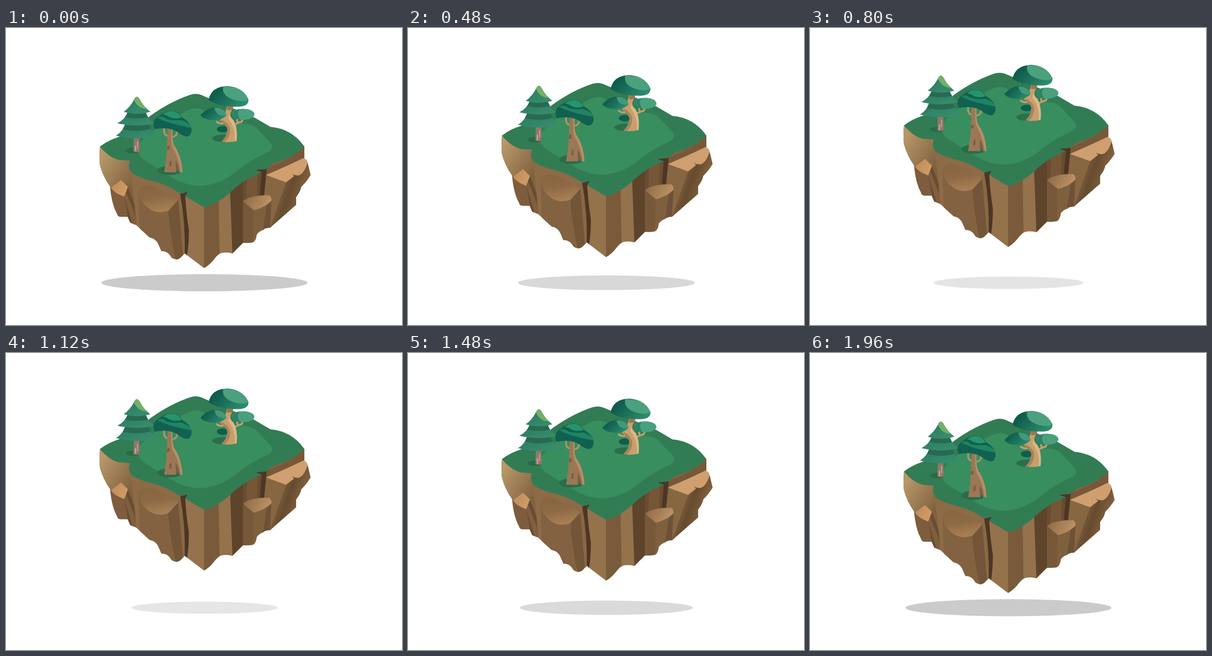
An HTML page for the animation above (2 s loop, 864 px wide and 648 px high).

```html
<!DOCTYPE html>
<html lang="en">
<head>
<meta charset="utf-8">
<title>Floating island</title>
<style>
  html, body { margin: 0; width: 100%; height: 100%; overflow: hidden; background: #fff; }
  svg { display: block; width: 100vw; height: 100vh; }
</style>
</head>
<body>
<svg viewBox="0 0 864 648">
  <defs>
    <linearGradient id="cliff" gradientUnits="userSpaceOnUse" x1="208" y1="280" x2="284" y2="328">
      <stop offset="0" stop-color="#b79869"/><stop offset="1" stop-color="#80613f"/>
    </linearGradient>
    <linearGradient id="boulder" x1=".4" y1="0" x2=".6" y2="1">
      <stop offset="0" stop-color="#87653f"/><stop offset=".45" stop-color="#8d6a45"/><stop offset="1" stop-color="#ab8156"/>
    </linearGradient>
    <linearGradient id="ledge" x1="0" y1=".3" x2="1" y2=".6">
      <stop offset="0" stop-color="#8f6c45"/><stop offset="1" stop-color="#c19468"/>
    </linearGradient>
    <linearGradient id="chip" x1="0" y1="0" x2="1" y2=".5">
      <stop offset="0" stop-color="#bb8a57"/><stop offset="1" stop-color="#d09b65"/>
    </linearGradient>
    <linearGradient id="east" gradientUnits="userSpaceOnUse" x1="603" y1="345" x2="652" y2="362">
      <stop offset="0" stop-color="#7b5b3a"/><stop offset=".35" stop-color="#664b2f"/><stop offset="1" stop-color="#856340"/>
    </linearGradient>
    <linearGradient id="leaf" x1="0" y1=".2" x2="1" y2=".7">
      <stop offset=".2" stop-color="#105d4d"/><stop offset="1" stop-color="#2d8d6f"/>
    </linearGradient>
    <linearGradient id="needle" x1="0" y1="0" x2="1" y2="1">
      <stop offset="0" stop-color="#2a7a63"/><stop offset="1" stop-color="#39906c"/>
    </linearGradient>
  </defs>

  <ellipse id="shadow" rx="225" ry="18.7"/>

  <g id="island">
    <!-- soil -->
    <path fill="#836342" d="M205 258Q203 285 205 299Q212 324 227 345Q230 382 242 404Q244 411 249 411H265L271 424L284 429L313 456Q328 459 333 472L339 486Q353 485 361 500Q370 507 380 501L390 491L432 523Q442 518 453 505Q463 492 470 490Q482 487 494 491L517 468Q545 469 547 450Q559 435 576 435L633 385V368Q643 355 644 346Q657 333 664.500 320L658 293Q656 288 651 284V258L433 240Z"/>
    <path fill="url(#cliff)" d="M205 258Q225 282 246 287L271 288L275 319L283 395L266 346L251 331L230 348L227 345Q212 324 205 299Q203 285 205 258Z"/>
    <path fill="#7d5d3d" d="M229 348L258 367L267 411H249Q244 411 242 404Q230 382 229 348Z"/>
    <path fill="#694d32" d="M258 367L266 346L282 388L284 429L271 424L266 411Z"/>
    <path fill="#7f5f3e" d="M258 367L262 357L281 405L284 429L276 426Z"/>
    <path fill="url(#chip)" d="M229 348L251 331L266 346L258 367Q238 361 229 348Z"/>
    <path fill="#8d6b47" d="M272 312L335 334L384 358L378 376L289 352L292 436L284 429L281 390Z"/>

    <!-- west boulder -->
    <path fill="#826240" d="M289 352L354 399L372 504L361 500Q353 485 339 486L333 472Q328 459 313 456L292 437Z"/>
    <path fill="#735537" d="M354 399L376 374L387 494L380 501Q374 505 370 504Q358 450 354 399Z"/>
    <path fill="#8a6844" d="M376 374L382 361L391 490L386 495Z"/>
    <path fill="url(#boulder)" d="M289 353Q295 342 314 342Q350 355 376 374L354 398Q335 405 318 397Q291 382 289 353Z"/>

    <!-- front faces -->
    <path fill="#94724c" d="M391 364L433 389V523L394 494Z"/>
    <path fill="#795b3b" d="M432 389L465 374L466 491Q458 497 453 505Q442 518 432 523Z"/>
    <path fill="#94724c" d="M464 375L490 355L494 491Q480 487 466 491Z"/>
    <path fill="#5e442b" d="M489 355L517 333V468L494 491Z"/>
    <path fill="#755738" d="M517 333L559 311L556 370L517 380Z"/>
    <path fill="#694c31" d="M517 333L526 327L524 375L517 379ZM549 315L558 311L555 368L548 368Z"/>
    <path fill="#4d3624" d="M380 361L397 356L391 367Q393 402 399 440Q399 474 395 495L390 491Q392 425 380 361Z"/>

    <!-- east rocks -->
    <path fill="#785838" d="M566 306Q625 285 651 257V285L568 321Z"/>
    <path fill="#876642" d="M567 320L611 336L604 378L578 434Q567 434 560 438L563 365Z"/>
    <path fill="url(#east)" d="M611 336L628 322L658 293L664.500 320Q657 333 644 346Q643 355 633 368V385L576 435Q594 385 611 336Z"/>
    <path fill="#cf9f6f" d="M567 320Q612 301 649 283Q657 285 658 293Q650 319 637 321Q630 321 624 317L628 323L611 336Z"/>
    <path fill="#4d3624" d="M543 309L569 306L563 366L554 364L558 314Z"/>
    <path fill="#775939" d="M517 376L541 397L539 467Q530 469 517 468Z"/>
    <path fill="#7f603e" d="M541 397L571 382L563 439Q549 444 547 450Q546 463 539 467Z"/>
    <path fill="#6e5137" d="M569 384L579 377L576 435Q568 435 561 439Z"/>
    <path fill="url(#ledge)" d="M517 377Q533 364 574 364Q580 368 579 376Q568 389 541 397Z"/>

    <!-- grass -->
    <path fill="#327c54" d="M205 258Q223 244 246 237Q285 216 316 190Q358 160 402 145Q417 140 432 148L541 194Q565 208 577 215Q624 219 651 258Q622 285 584 294Q574 302 567 307L544 309L558 314Q520 328 489 358Q466 380 433 391L391 366L396 357L381 361Q352 342 330 336Q289 326 274 315Q264 301 271 289L246 287Q225 281 205 258Z"/>
    <path fill="#388e5e" d="M394 180Q416 168 434 180L460 197Q488 208 523 208Q539 209 549 220L576 249Q586 260 574 269Q524 292 498 316Q433 363 368 329L302 288Q281 273 291 252Q320 215 394 180Z"/>

    <!-- pine -->
    <ellipse cx="277" cy="267" rx="16" ry="6" fill="#296a49"/>
    <path fill="#92766a" d="M279 238H291L292 269Q285 271 278 269Z"/>
    <path fill="#bba69a" d="M281 256H284V268H281ZM286 246H288V262H286Z"/>
    <path fill="url(#needle)" d="M260 209Q254 226 240 234Q285 246 331 235Q316 226 310 209Z"/>
    <path fill="#286a51" d="M260 209L255 220Q288 228 316 219L310 209Z"/>
    <path fill="url(#needle)" d="M265 184Q258 200 243 207Q284 217 325 207Q311 200 305 184Z"/>
    <path fill="#286a51" d="M265 184L260 194Q286 199 310 194L305 184Z"/>
    <path fill="url(#needle)" d="M257 182Q271 172 279 156Q285 143 292 155Q300 171 315 182Q285 191 257 182Z"/>
    <path fill="#73af68" d="M279 156Q285 143 292 155Q299 169 309 176Q288 176 279 156Z"/>

    <!-- front tree -->
    <ellipse cx="357" cy="310" rx="27" ry="10" fill="#2a6c49"/>
    <g fill="none" stroke="#b68f68" stroke-width="4">
      <path d="M345 216V226Q346 235 357 235M373 216V228Q372 236 361 237"/>
    </g>
    <path fill="#9a7856" d="M354 214H364Q361 242 367 256Q383 278 385 314H378Q374 303 371 314H345Q351 280 352 238Z"/>
    <path fill="#b68f68" d="M361 220L364 214Q361 242 367 256Q383 278 385 314H381Q378 285 364 261Q359 250 361 220Z"/>
    <path fill="#7c5d44" d="M352 257L357 256V264L351 265ZM357 291L361 287V300L356 302ZM370 288Q377 298 378 313Q374 303 371 313Z"/>
    <path fill="#116150" d="M322 213Q320 199 334 191Q345 181 363 180Q380 182 382 193Q404 205 405 221Q404 236 394 236Q385 235 374 226Q355 214 326 220Q322 218 322 213Z"/>
    <path fill="#1f8464" d="M330 195Q340 189 350 198Q365 202 382 200Q403 207 405 217Q391 215 376 211Q349 205 330 195Z"/>
    <path fill="#25956c" d="M342 188Q351 180 365 181Q379 183 382 195Q365 199 354 192Q348 188 342 188Z"/>

    <!-- back tree -->
    <ellipse cx="475" cy="240" rx="25" ry="8" fill="#2b6e4b"/>
    <g fill="none" stroke="#c59d6e" stroke-width="4" stroke-linecap="round">
      <path d="M460 204Q466 209 474 207M495 214Q502 206 514 204L516 200M506 207L504 200"/>
    </g>
    <ellipse cx="473" cy="220" rx="13" ry="7" fill="#105d4d"/>
    <path fill="#c79f6f" d="M483 166H496L494 177Q484 190 496 200Q506 216 503 246Q487 250 470 247Q483 235 483 220Q481 210 466 201L473 194Q480 184 483 166Z"/>
    <path fill="#a9845b" d="M473 200Q491 211 489 226Q487 240 477 248L470 247Q483 235 483 220Q481 210 466 201Z"/>
    <path fill="#dcb786" d="M489 184Q486 192 496 200Q506 216 503 246H499Q502 218 485 197Z"/>
    <path fill="#987550" d="M483 168H496L495 177Q488 180 482 178Z"/>
    <ellipse cx="517.500" cy="187.500" rx="24.500" ry="12" fill="#4a9f7d"/>
    <path fill="#2c8367" d="M493 188Q497 177 511 176Q501 184 511 199Q496 197 493 188Z"/>
    <path fill="url(#leaf)" d="M424 190Q438 173 459 172Q478 175 481 190Q470 202 450 200Q432 199 424 190Z"/>
    <path fill="#429878" d="M455 173Q477 173 481 190Q458 194 455 173Z"/>
    <path fill="url(#leaf)" d="M442 156Q448 127 482 126Q517 128 529 155Q530 171 506 171Q462 171 442 156Z"/>
    <path fill="#4ba07e" d="M474 127Q515 125 529 155Q521 162 500 157Q469 148 474 127Z"/>
  </g>
</svg>
<script>
  const LOOP = 2000, STEP = 40, LIFT = 51, REST = 0.7;
  const island = document.getElementById('island');
  const shadow = document.getElementById('shadow');

  function draw(now) {
    const t = Math.floor(now % LOOP / STEP) * STEP;
    const rise = (1 - Math.cos(2 * Math.PI * t / LOOP)) / 2;
    const grey = Math.round(203 + 28 * rise);
    island.setAttribute('transform', `translate(0 ${REST - LIFT * rise})`);
    shadow.setAttribute('transform', `translate(433 555.8) scale(${1 - 0.302 * rise})`);
    shadow.setAttribute('fill', `rgb(${grey},${grey},${grey})`);
  }

  const start = performance.now();
  function tick() {
    draw(performance.now() - start);
    requestAnimationFrame(tick);
  }
  tick();
</script>
</body>
</html>
```
